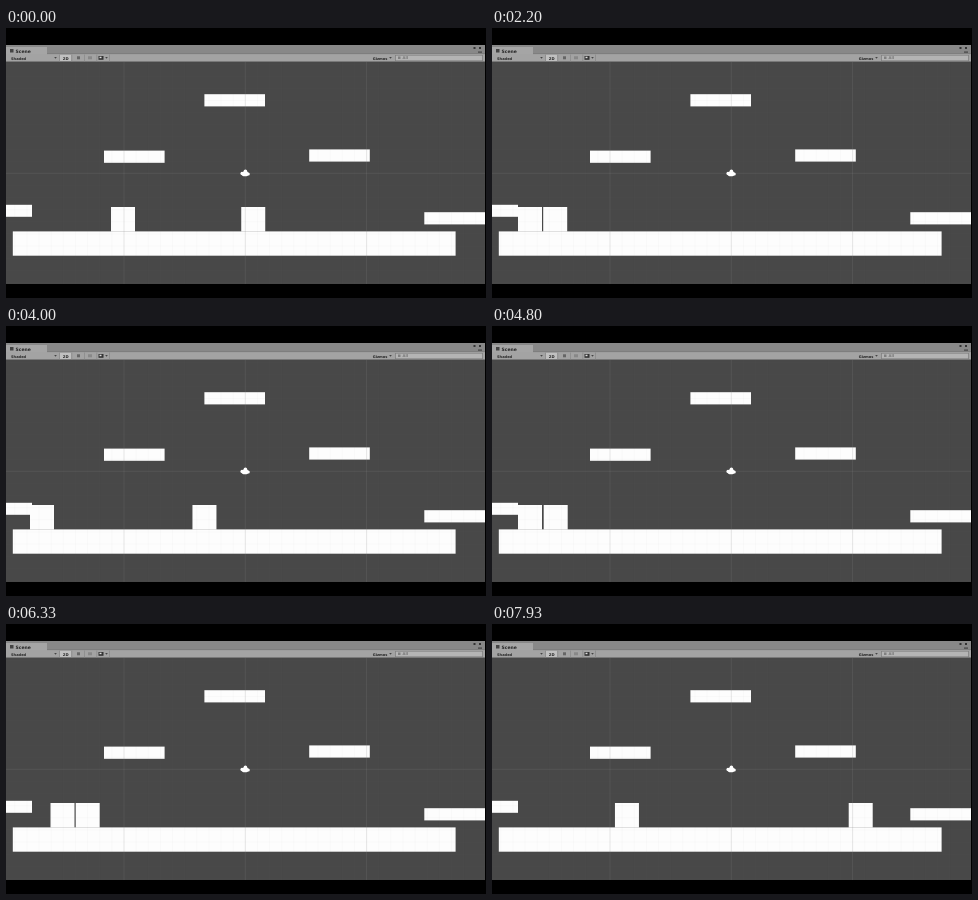
These frames come from a looping animation (480x270 px, 8 s). An HTML page with a canvas:

```html
<!DOCTYPE html>
<html>
<head>
<meta charset="utf-8">
<style>
html, body { margin: 0; width: 100%; height: 100%; overflow: hidden; background: #000; }
canvas { display: block; width: 480px; height: 270px; }
</style>
</head>
<body>
<canvas id="stage" width="480" height="270"></canvas>
<script>
const ctx = document.getElementById('stage').getContext('2d');
const LOOP = 8000;
const STEP = 1000 / 15;
const SIZE = 24;
const GAP = 25.2;
const SPEED = .15;
const WALL = 26;
const RIGHT = 479;
const BOTTOM = 256;

// Key presses that steer the left block: [time, direction]
const presses = [
  [0, -1], [1050, 1], [1190, -1], [1400, 0], [2540, 1], [3148, -1],
  [4500, 0], [5010, 1], [5260, -1], [6100, 0], [6210, 1], [6680, -1], [7287, 1]
];

// Turning points of the right block, which glides between them: [time, x]
const turns = [
  [-727, 51], [136, 247], [1153, 50], [1660, 134], [1900, 134], [2200, 51],
  [2540, 51], [3505, 260], [4727, 51.7], [5010, 51.7], [5540, 169],
  [6091, 51], [6210, 51], [7060, 228], [7270, 212], [8050, 365]
];

// Constant speed; pressing left sinks the block slightly into the wall.
function leftX(t) {
  let x = 105;
  presses.forEach(([from, dir], i) => {
    if (from > t) return;
    const to = i + 1 < presses.length ? presses[i + 1][0] : LOOP;
    const floor = dir < 0 ? WALL - 2 : WALL;
    x = Math.max(floor, Math.max(floor, x) + dir * SPEED * (Math.min(t, to) - from));
  });
  return x;
}

function rightX(t) {
  const i = turns.findIndex(k => k[0] > t);
  const [t0, x0] = turns[i - 1], [t1, x1] = turns[i];
  const eased = (1 - Math.cos(Math.PI * (t - t0) / (t1 - t0))) / 2;
  return x0 + (x1 - x0) * eased;
}

function box(color, x, y, w, h) {
  ctx.fillStyle = color;
  ctx.fillRect(x, y, w, h);
}

function label(text, x, y, size, color = '#262626') {
  ctx.fillStyle = color;
  ctx.font = `bold ${size}px "DejaVu Sans", sans-serif`;
  ctx.fillText(text, x, y);
}

function arrow(x) {
  ctx.fillStyle = '#444';
  ctx.beginPath();
  ctx.moveTo(x - 1.3, 29);
  ctx.lineTo(x + 1.3, 29);
  ctx.lineTo(x, 30.8);
  ctx.fill();
}

function drawHeader() {
  box('#888', 0, 17, RIGHT, 9);
  box('#a5a5a5', 0, 19, 41, 7.5);
  box('#a3a3a3', 0, 26, RIGHT, 8);
  box('#777', 41, 25.5, RIGHT - 41, .6);
  box('#707070', 0, 33.2, RIGHT, .8);
  box('#444', 4, 21, 3.5, 3.5);
  label('Scene', 9.5, 25, 4.5);
  label('Shaded', 5, 31.6, 3.6);
  box('#c0c0c0', 54, 27, 11, 6);
  label('2D', 56.8, 31.6, 3.8);
  for (let i = 0; i < 5; i++) box('#888', 53 + i * 12.5, 26.5, .7, 7);
  box('#666', 71, 28.3, 3, 3);
  box('#888', 82, 28.3, 4, 3);
  box('#333', 92.5, 28, 5, 3.8);
  box('#ddd', 93.5, 28.7, 2, 1.5);
  label('Gizmos', 366.7, 31.6, 3.6);
  [49.5, 100.5, 384.5].forEach(arrow);
  box('#808080', 389, 27, 88, 6);
  box('#b4b4b4', 389.8, 27.6, 86.4, 4.8);
  box('#808080', 392, 28.5, 2.5, 2.5);
  label('All', 396.5, 31.4, 3.8, '#777');
  box('#333', 467.5, 19, 2, 2);
  box('#333', 473, 19, 2, 2);
  box('#444', 472, 23.5, 4, 1.2);
}

function drawGrid() {
  const cell = 12.13;
  const shade = i => `rgba(135,135,135,${i % 10 ? .03 : .2})`;
  for (let i = -19; i <= 19; i++) box(shade(i), 238.8 + i * cell, 34, 1, BOTTOM - 34);
  for (let i = -9; i <= 9; i++) box(shade(i), 0, 144.8 + i * cell, RIGHT, 1);
}

function drawCamera() {
  ctx.fillStyle = '#fff';
  ctx.beginPath();
  ctx.ellipse(239, 145.9, 3.6, 2.3, 0, 0, Math.PI * 2);
  ctx.fill();
  for (const [x, y, r] of [[239.4, 143.2, 1.8], [236, 145.4, 1.6], [242.3, 146, 1.5]]) {
    ctx.beginPath();
    ctx.arc(x, y, r, 0, Math.PI * 2);
    ctx.fill();
  }
}

function draw(t) {
  const left = leftX(t);
  const right = Math.max(rightX(t), left + GAP);
  const solid = (x, y, w, h) => box('#fdfdfd', x, y, w, h);

  box('#000', 0, 0, 480, 270);
  box('#484848', 0, 34, RIGHT, BOTTOM - 34);
  solid(198.4, 66.2, 60.6, 12.2);
  solid(98, 122.6, 60.6, 12.2);
  solid(303.2, 121.4, 60.6, 12.2);
  solid(0, 176.8, 26, 12);
  solid(418.3, 184.2, RIGHT - 418.3, 12.2);
  solid(6.8, 203.4, 442.8, 24.3);
  for (const x of [left, right]) solid(x, 179, SIZE, 24.6);
  drawGrid();
  drawCamera();
  drawHeader();
}

const start = performance.now();
function tick() {
  const t = (performance.now() - start) % LOOP;
  draw(Math.floor(t / STEP + .05) * STEP);
  requestAnimationFrame(tick);
}
tick();
</script>
</body>
</html>
```
